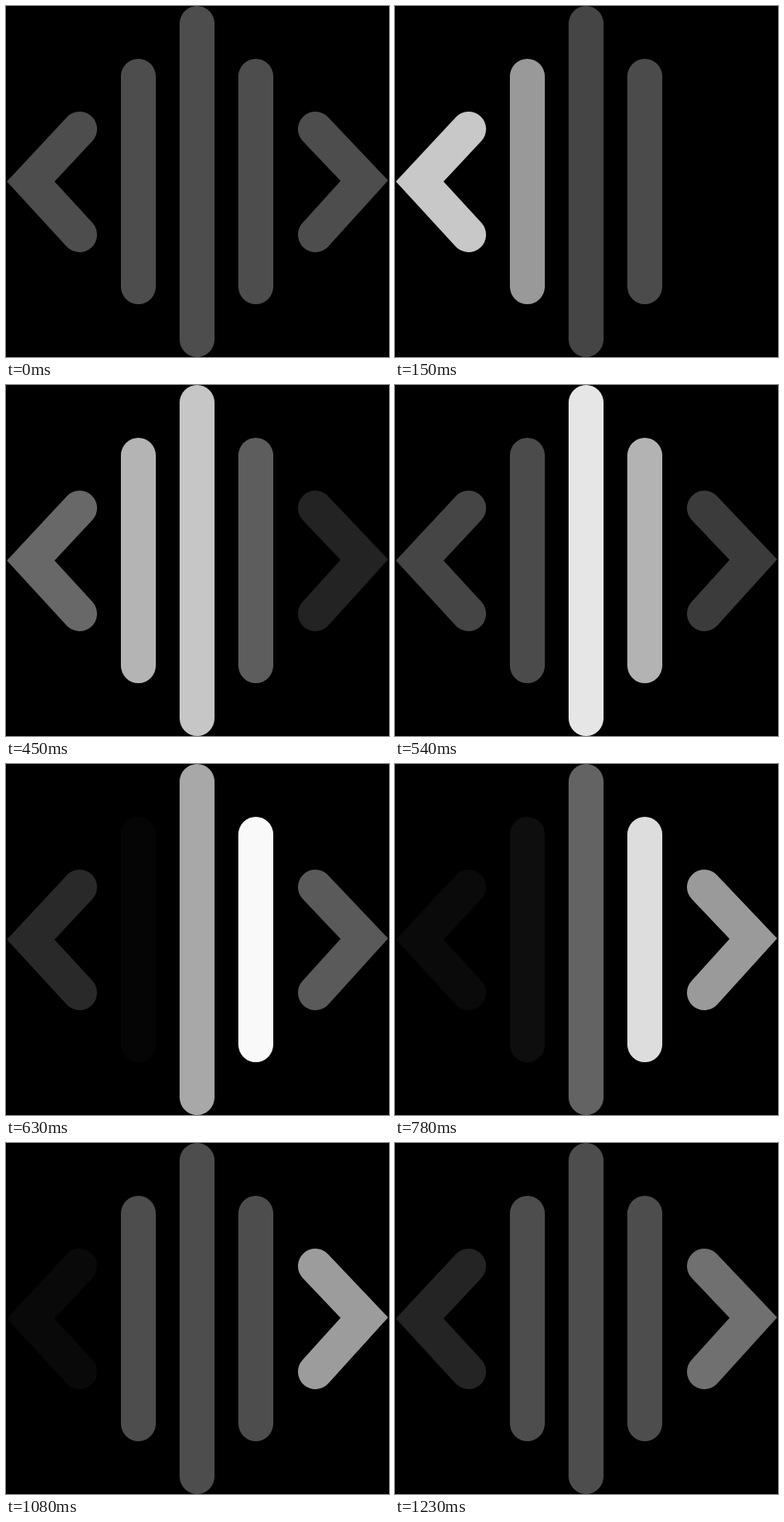
An HTML page for the animation above (1380 ms loop, 450 px wide and 412 px high).

```html
<!DOCTYPE html>
<html lang="en">
<head>
<meta charset="utf-8">
<title>Pulsing bars</title>
<style>
  html, body { margin: 0; width: 100%; height: 100%; overflow: hidden; background: #000; }
  svg { display: block; width: 450px; height: 412px; }
  path { fill: none; stroke: #fff; stroke-width: 41; stroke-linecap: round; stroke-linejoin: miter; }
</style>
</head>
<body>
<svg viewBox="0 0 450 412">
  <path d="M86.5 144.5 29 206 86.5 268.5"/>
  <path d="M155.5 82.5V329.5"/>
  <path d="M224.5 20.5V391.5"/>
  <path d="M293.5 82.5V329.5"/>
  <path d="M363.5 144.5 421 205 363.5 268.5"/>
</svg>
<script>
  const LOOP = 1380, STEP = 30, LAST = 1230, REST = 0.3;

  const swell = s => s * s;
  const smooth = s => (1 - Math.cos(Math.PI * s)) / 2;

  // A wave of light crosses left to right: each shape leaves its rest level,
  // peaks, dips to a low before or after that, and settles.
  const pulses = [
    { ease: swell, peak: 180, dip: 930, low: 0, settle: LAST, end: 0.14 },
    { ease: smooth, peak: 330, dip: 660, low: 0, settle: 1080 },
    { ease: swell, peak: 510, dip: 150, low: 0.27, settle: 930 },
    { ease: smooth, peak: 660, dip: 390, low: 0.28, settle: 1080 },
    { ease: swell, peak: 960, dip: 150, low: 0, settle: LAST, end: 0.44 }
  ];

  const shapes = document.querySelectorAll('path');

  function levelAt({ ease, peak, dip, low, settle, end = REST }, t) {
    const keys = [[0, REST], [peak, 1], [dip, low], [settle, end]].sort((a, b) => a[0] - b[0]);
    const next = keys.findIndex(key => key[0] > t);
    if (next < 0) return end;
    const [t0, a] = keys[next - 1], [t1, b] = keys[next];
    const s = (t - t0) / (t1 - t0);
    // Ease from the darker end, so the light gathers towards the brighter one.
    return a < b ? a + (b - a) * ease(s) : b + (a - b) * ease(1 - s);
  }

  function draw(now) {
    const t = Math.min(LAST, Math.floor((now % LOOP) / STEP) * STEP);
    shapes.forEach((shape, i) => {
      const v = Math.round(255 * levelAt(pulses[i], t));
      shape.style.stroke = `rgb(${v},${v},${v})`;
    });
  }

  const start = performance.now();
  function tick() {
    draw(performance.now() - start);
    requestAnimationFrame(tick);
  }
  tick();
</script>
</body>
</html>
```
